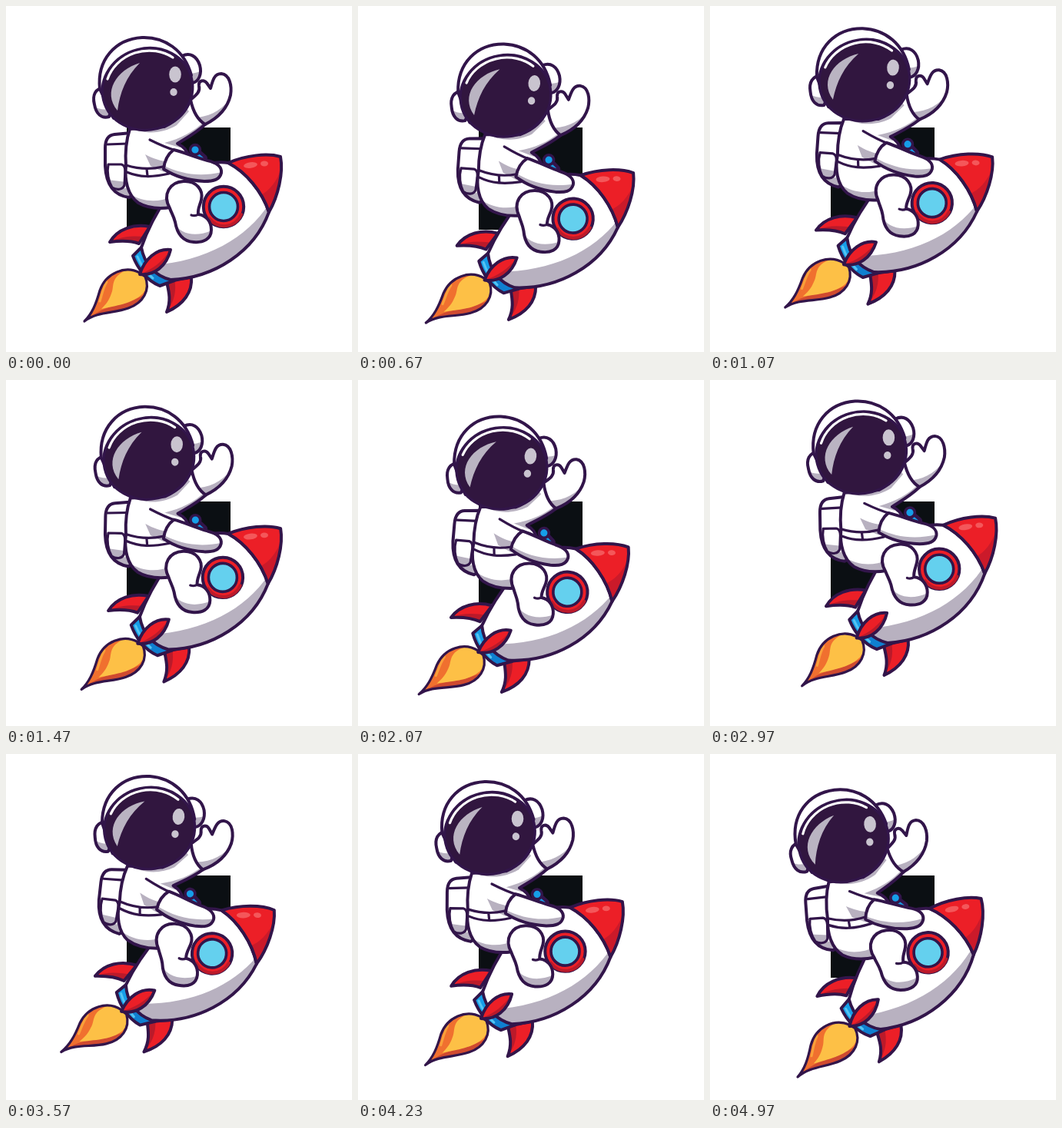
Animation, 450 px wide and 450 px high, one loop 5010 ms. Source, as an HTML page:

```html
<!DOCTYPE html>
<html lang="en">
<head>
<meta charset="utf-8">
<title>Astronaut on a rocket</title>
<style>
  html, body { margin: 0; width: 100%; height: 100%; overflow: hidden; background: #fff; }
  svg { display: block; width: 100vw; height: 100vh; }
</style>
</head>
<body>
<svg viewBox="0 0 450 450">
  <rect x="157" y="158" width="135" height="133" fill="#0b0f13"/>
  <g id="ride" stroke-linecap="round" stroke-linejoin="round"></g>
</svg>
<script>
const INK = '#32154a', VISOR = '#31163f', WHITE = '#fff', SHADE = '#b8b1c0';
const RED = '#ec1f27', DARK_RED = '#bb1a2a', BLUE = '#169ee8';
const ride = document.getElementById('ride');
let clips = 0;

const fill = (d, color) => `<path d="${d}" fill="${color}"/>`;
const line = (d, width = 3.2, color = INK) =>
  `<path d="${d}" fill="none" stroke="${color}" stroke-width="${width}"/>`;

// A filled outline whose inner details are clipped to its edge.
function part(d, color, inner = '', width = 4) {
  const id = 'clip' + clips++;
  return `<clipPath id="${id}"><path d="${d}"/></clipPath>` + fill(d, color) +
    `<g clip-path="url(#${id})">${inner}</g>` + line(d, width);
}

const ellipse = (x, y, rx, ry, color, extra = '') =>
  `<ellipse cx="${x}" cy="${y}" rx="${rx}" ry="${ry}" fill="${color}" ${extra}/>`;
const ring = (x, y, r, color, width) =>
  ellipse(x, y, r, r, color, `stroke="${INK}" stroke-width="${width}"`);

const flame = part(
  'M174 347C155 337 130 347 122 370C117 388 112 400 102 410C119 397 140 400 159 393C179 386 188 369 181 352Z',
  '#f0702f',
  fill('M102 410C124 392 140 390 158 386L180 376L170 402L106 414Z', '#cf4a30') +
  fill('M150 347C136 356 141 366 137 374C134 383 130 388 124 394C142 390 165 387 178 374C186 364 186 352 178 346C168 341 157 342 150 347Z', '#fdc046') +
  line('M131 359C126 367 125 375 122 384', 3, '#f9a13a'), 3.2);

const fins =
  part('M187 287C166 283 145 290 135 307C150 305 162 305 173 309Z', RED,
    fill('M136 307C150 299 166 299 182 300L174 312Z', DARK_RED)) +
  part('M241 352C243 372 231 388 209 398C215 383 212 372 209 359Z', RED,
    fill('M209 398C219 384 222 371 219 354L206 358Z', DARK_RED));

const tail = part('M177 313L165 325C171 341 183 357 200 364L219 357Z', BLUE,
  fill('M182 346L200 366L222 358L196 342Z', '#0f7fd0') +
  line('M171 326C176 338 183 347 191 354', 3, '#55c4f2'));

const hull = part(
  'M289 204C262 200 232 214 211 246C196 268 184 291 176 314C180 336 194 351 214 356C270 354 323 320 342 268C333 241 312 216 289 204Z',
  WHITE, fill('M344 254C316 300 262 332 190 337L180 364L290 364L360 290Z', SHADE));

const nose = part('M289 204C312 194 340 191 357 196C361 217 354 247 342 268C333 241 312 216 289 204Z', RED,
  fill('M358 212C352 228 343 240 331 246L342 272L364 250Z', '#cb1a2a') +
  ellipse(318, 207, 9, 3.8, '#f4575a', 'transform="rotate(-8 318 207)"') +
  ellipse(336, 205, 5, 3.4, '#f4575a'));

const porthole = ring(283, 261, 26.2, RED, 4) +
  line('M264 276A24 24 0 0 0 306 271', 4, DARK_RED) +
  ring(283, 261, 18.5, '#64d0ee', 3.6);

const frontFin = part('M214 317C196 315 180 329 174 349C193 351 209 338 214 317Z', RED,
  fill('M214 317C203 333 191 342 174 349L196 356L218 334Z', DARK_RED));

const pack = part('M163 165L141 167C132 168 129 175 129 185L129 208C130 230 139 246 160 249L174 240Z', WHITE,
    fill('M130 228C141 238 156 239 170 234L170 254L134 252Z', SHADE)) +
  line('M132 180L158 179') +
  part('M133 206L150 206C154 207 155 210 155 215L154 233C152 239 144 240 138 236C133 228 131 216 133 206Z', WHITE,
    fill('M132 226L157 229L155 242L134 242Z', SHADE), 3.2);

const torso = part(
  'M161 160C155 178 155 194 156 208C154 226 158 246 172 256C186 264 200 264 214 262L237 232L238 196C235 187 231 183 223 179C234 172 246 166 259 154L240 122C234 137 225 148 206 157Z',
  WHITE,
  fill('M163 158C180 168 204 166 222 155L238 137L230 128L170 150Z', SHADE) +
  fill('M206 178C228 172 244 164 260 148L264 158L226 184Z', SHADE) +
  fill('M181 193C192 199 205 203 214 202L206 216L188 208Z', SHADE) +
  fill('M160 244C178 255 197 256 216 248L216 268L170 266Z', SHADE)) +
  line('M156 207C172 212 188 213 204 209') +
  line('M157 216C174 223 190 223 212 218') +
  line('M183 212L184 221') +
  line('M187 174C199 180 210 185 221 188');

const wave = part(
  'M240 122C247 116 253 112 251 104C250 97 257 95 261 100L266 107C269 96 271 88 280 88C291 89 294 104 292 116C288 133 275 146 259 154C249 148 243 136 240 122Z',
  WHITE, fill('M297 110C288 130 272 142 250 145L258 160L296 138Z', SHADE));

const leg = part(
  'M213 263C203 245 213 229 231 228C248 227 257 240 254 252C252 260 249 264 250 271C260 272 267 280 267 291C267 303 257 308 244 307C228 306 222 293 220 281C218 273 215 269 213 263Z',
  WHITE, fill('M219 283C227 297 248 302 272 290L268 312L228 310Z', SHADE)) +
  line('M250 271C247 273 244 273 241 272');

const arm = part(
  'M218 187C231 190 247 197 262 201C275 204 281 210 280 217C278 226 270 228 258 228C238 227 220 222 205 212C206 202 210 193 218 187Z',
  WHITE, fill('M204 207C228 219 254 223 284 215L280 232L226 230Z', SHADE));

const ears =
  part('M128 106C116 107 112 116 115 128C117 140 124 147 134 144L142 120Z', WHITE,
    fill('M112 130C121 135 131 136 140 132L138 150L116 148Z', SHADE)) +
  part('M229 65C239 60 248 65 252 77C255 88 251 98 243 100L230 88Z', WHITE,
    fill('M258 81C251 87 244 88 236 88L242 104L258 98Z', SHADE));

const helmet =
  part('M122 108C118 70 142 43 177 41C206 40 232 57 241 90L210 145L140 146Z', WHITE,
    fill('M196 40C210 45 226 55 238 72L244 60L210 38Z', SHADE)) +
  ellipse(184, 108, 59, 53, VISOR, `transform="rotate(-14 184 108)" stroke="${INK}" stroke-width="3.4"`) +
  line('M132 95A54.5 49 -14 0 1 217 67', 3.2, WHITE) +
  fill('M174 74C144 83 125 112 145 136C148 113 156 92 174 74Z', '#bab4c2') +
  ellipse(220, 89, 7.8, 10.5, '#c9c4cf') +
  ellipse(218, 112, 4.7, 5, '#c9c4cf');

const knob = line('M247 189L257 198', 10) + line('M248 192L255 198', 3.6, BLUE) +
  ring(246, 187, 6.4, BLUE, 3.6);

ride.innerHTML = flame + fins + tail + hull + nose + porthole + frontFin + knob +
  pack + torso + wave + leg + arm + ears + helmet;

// time, x, y, angle in degrees
const KEYS = [
  [0, 0, 0, 0], [270, 0, 7, .4], [530, -.5, 13, 2.2], [670, -.6, 11.4, 4.2],
  [800, 1.5, 5, 5.2], [1070, 8.5, -9, 4], [1250, 8, -13, 1.6], [1470, -.5, -5.1, 1.1],
  [1600, -4, 5.5, 3.3], [1850, -8, 7.5, 6.5], [2070, -7.3, 10, 4.9], [2400, 1, 16, -.5],
  [2670, 10, 1.8, -4.4], [2970, 14.6, -14.3, -.9], [3200, 6, -10.8, 3.9], [3460, -6, -8, 6],
  [3780, -18, -8, 6.2], [4000, -18, -8, 3.8], [4230, -13.4, -4.8, .4], [4550, -7, 1.5, -3.2],
  [4800, -2.7, 3.5, -5], [4970, -1.9, 1.6, -4.2]
];
const LOOP = 5010, STEP = 33.34, LAST = 149;

function slope(i, c) {
  const a = KEYS[Math.max(i - 1, 0)], b = KEYS[Math.min(i + 1, KEYS.length - 1)];
  return (b[c] - a[c]) / (b[0] - a[0]);
}

// Smooth cubic through the keys.
function pose(t) {
  let i = 0;
  while (i < KEYS.length - 2 && t >= KEYS[i + 1][0]) i++;
  const a = KEYS[i], b = KEYS[i + 1], span = b[0] - a[0];
  const u = Math.min((t - a[0]) / span, 1), v = 1 - u;
  return [1, 2, 3].map(c =>
    v * v * (1 + 2 * u) * a[c] + u * u * (3 - 2 * u) * b[c] +
    u * v * span * (v * slope(i, c) - u * slope(i + 1, c)));
}

function draw() {
  const t = performance.now() % LOOP;
  const step = Math.min(Math.floor((t + 4) / STEP), LAST);
  const [x, y, angle] = pose(step * STEP);
  ride.setAttribute('transform', `translate(${x} ${y}) rotate(${angle} 225 225)`);
  requestAnimationFrame(draw);
}
draw();
</script>
</body>
</html>
```
